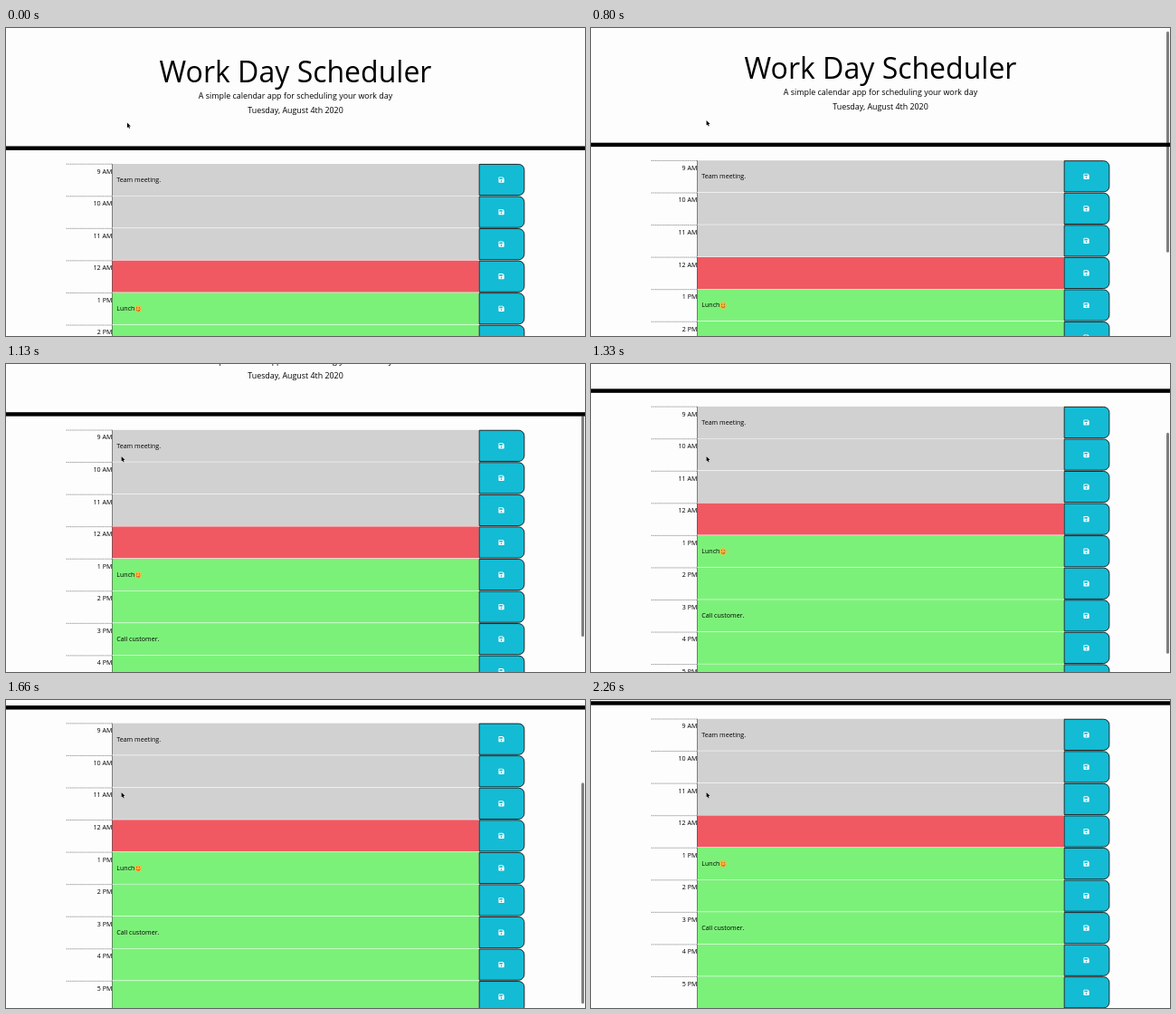
An HTML page with a canvas that plays this animation: 640x340 px, repeating every 2530 ms.

```html
<!DOCTYPE html>
<html lang="en">
<head>
<meta charset="utf-8">
<title>Scheduler</title>
<style>
  html, body { margin: 0; width: 100%; height: 100%; overflow: hidden; background: #fdfdfd; }
  canvas { display: block; }
</style>
</head>
<body>
<canvas id="stage" width="640" height="340"></canvas>
<script>
const ctx = document.getElementById('stage').getContext('2d');
const LOOP = 2530, STEP = 200 / 3;
const SCALE = 640 / 1440; // the page is laid out 1440 units wide
const SCROLL = { start: 787, end: 2110, distance: 129.2 };
const ROW_TOP = 336.5, ROW_HEIGHT = 80;
const LEFT = 150, TEXT_LEFT = 264, BUTTON_LEFT = 1176, RIGHT = 1290;
const PAST = '#d1d1d1', PRESENT = '#f05962', FUTURE = '#7cf17a', BLUE = '#14bbd4';
const ROWS = [
  ['9 AM', PAST, 'Team meeting.'], ['10 AM', PAST], ['11 AM', PAST], ['12 AM', PRESENT],
  ['1 PM', FUTURE, 'Lunch'], ['2 PM', FUTURE], ['3 PM', FUTURE, 'Call customer.'],
  ['4 PM', FUTURE], ['5 PM', FUTURE],
];

const progress = (t, from, to) => Math.min(1, Math.max(0, (t - from) / (to - from)));

function rect(x, y, w, h, color) {
  ctx.fillStyle = color;
  ctx.fillRect(x, y, w, h);
}

function text(str, x, y, size, align = 'left') {
  ctx.font = `${size}px "Open Sans", sans-serif`;
  ctx.textAlign = align;
  ctx.fillStyle = '#000';
  ctx.fillText(str, x, y);
}

function disc(x, y, r, color) {
  ctx.fillStyle = color;
  ctx.beginPath();
  ctx.arc(x, y, r, 0, 7);
  ctx.fill();
}

function saveIcon(x, y) {
  ctx.fillStyle = '#fff';
  ctx.fill(new Path2D(`M${x - 5.5} ${y - 7}h9l3.5 3.5v9q0 1.5-1.5 1.5h-11q-1.5 0-1.5-1.5v-11q0-1.5 1.5-1.5z`));
  rect(x - 5, y - 5, 8, 4, BLUE);
  disc(x, y + 3, 2, BLUE);
}

function smiley(x, y) {
  disc(x, y, 8.5, '#f5b93c');
  disc(x - 3, y - 2.5, 1.2, '#6b4015');
  disc(x + 3, y - 2.5, 1.2, '#6b4015');
  ctx.strokeStyle = '#8a4a1c';
  ctx.lineWidth = 1.6;
  ctx.beginPath();
  ctx.arc(x, y, 5, 0.3, 2.8);
  ctx.stroke();
  disc(x + 2, y + 5, 1.8, '#e8604c');
}

function saveButton(y) {
  ctx.beginPath();
  ctx.roundRect(BUTTON_LEFT + 1, y + 2, RIGHT - BUTTON_LEFT - 2, ROW_HEIGHT - 3, [0, 14, 14, 0]);
  ctx.fillStyle = BLUE;
  ctx.fill();
  ctx.strokeStyle = '#111';
  ctx.lineWidth = 2;
  ctx.stroke();
  saveIcon((BUTTON_LEFT + RIGHT) / 2 - 1, y + 40.5);
}

function row([hour, color, note], i) {
  const y = ROW_TOP + i * ROW_HEIGHT;
  ctx.strokeStyle = '#000';
  ctx.lineWidth = 1;
  ctx.setLineDash([3, 2]);
  ctx.beginPath();
  ctx.moveTo(LEFT, y + 1.5);
  ctx.lineTo(TEXT_LEFT, y + 1.5);
  ctx.stroke();
  ctx.setLineDash([]);
  text(hour, TEXT_LEFT, y + 25, 16, 'right');

  rect(TEXT_LEFT, y, BUTTON_LEFT - TEXT_LEFT, 1, '#fff');
  rect(TEXT_LEFT, y + 1, BUTTON_LEFT - TEXT_LEFT, ROW_HEIGHT - 1, color);
  rect(TEXT_LEFT, y + 1, 1, ROW_HEIGHT - 1, '#000');
  if (note) text(note, TEXT_LEFT + 11, y + 46, 16);
  if (note === 'Lunch') smiley(328.5, y + 41);
  saveButton(y);
}

function page() {
  text('Work Day Scheduler', 720, 135, 72, 'center');
  text('A simple calendar app for scheduling your work day', 720, 174.5, 20, 'center');
  text('Tuesday, August 4th 2020', 720, 210.5, 20, 'center');
  rect(0, 293.5, 1440, 10, '#000');
  ROWS.forEach(row);
}

function scrollbar(scroll, alpha) {
  ctx.fillStyle = `rgba(0, 0, 0, ${alpha})`;
  ctx.beginPath();
  ctx.roundRect(636, 1 + scroll * 0.725, 3, 244, 1.5);
  ctx.fill();
}

function pointer(x, y) {
  const arrow = new Path2D(`M${x} ${y}v5.6l1.3-1.2 .9 2 .9-.4-.9-2h1.8z`);
  ctx.strokeStyle = '#fff';
  ctx.lineWidth = 0.8;
  ctx.stroke(arrow);
  ctx.fillStyle = '#000';
  ctx.fill(arrow);
}

function draw(t) {
  const scroll = SCROLL.distance * (1 - (1 - progress(t, SCROLL.start, SCROLL.end)) ** 3);
  rect(0, 0, 640, 340, '#fdfdfd');
  ctx.save();
  ctx.translate(0, -scroll);
  ctx.scale(SCALE, SCALE);
  page();
  ctx.restore();

  if (scroll > 0 && t < 2250) scrollbar(scroll, t < 2190 ? 0.5 : 0.25);
  const p = progress(t, 0, 560), move = p * p * (3 - 2 * p);
  pointer(133.9 - 6.3 * move, 104.6 - 2.6 * move);
}

function tick(now) {
  draw(Math.floor((now % LOOP + 7) / STEP) * STEP);
  requestAnimationFrame(tick);
}
requestAnimationFrame(tick);
</script>
</body>
</html>
```
